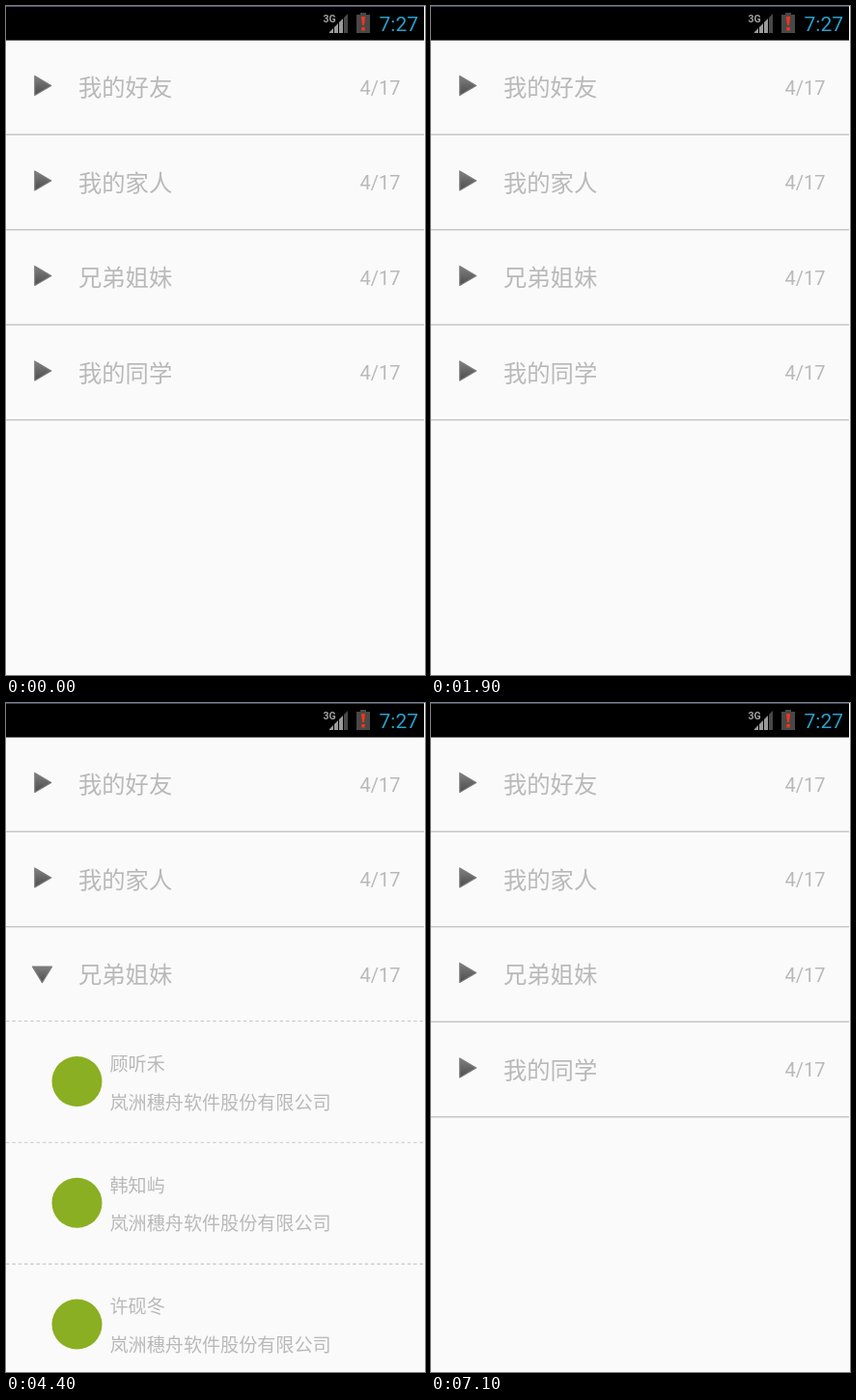
Animation of 434x693 px, one loop 8000 ms. Source, as an HTML page:

```html
<!DOCTYPE html>
<html lang="zh-CN">
<head>
<meta charset="utf-8">
<title>分组列表</title>
<style>
html, body { margin: 0; width: 100%; height: 100%; overflow: hidden; background: #fafafa; }
svg { display: block; width: 434px; height: 693px; }
text { font-family: "Noto Sans CJK SC", "Noto Sans CJK", sans-serif; fill: #b9b9b9; }
.title { font-size: 24.3px; }
.child { font-size: 19.1px; }
.count, .clock, .net { font-family: Roboto, sans-serif; }
.count { font-size: 20px; text-anchor: end; }
.pressed text { fill: #302c22; }
.clock { font-size: 21px; fill: #2a9fcb; }
.net { font-size: 10.5px; font-weight: bold; fill: #a0a0a0; }
.line { stroke: #c7c7c7; stroke-width: 1.4; }
.dash { stroke: #c9c9c9; stroke-width: 1.1; stroke-dasharray: 3.6 2.7; }
.arrow { fill: url(#steel); stroke: #7c7c7c; stroke-width: 1.2; stroke-linejoin: round; }
</style>
</head>
<body>
<svg viewBox="0 0 434 693">
  <defs>
    <linearGradient id="steel" x1="0" y1="0" x2="0" y2="1">
      <stop offset="0" stop-color="#808080"/><stop offset="1" stop-color="#4c4c4c"/>
    </linearGradient>
    <linearGradient id="edgeX">
      <stop offset="0" stop-color="#f8a305"/><stop offset=".06" stop-color="#f8a305" stop-opacity="0"/>
      <stop offset=".94" stop-color="#f8a305" stop-opacity="0"/><stop offset="1" stop-color="#f8a305"/>
    </linearGradient>
    <linearGradient id="edgeY" x1="0" y1="0" x2="0" y2="1">
      <stop offset="0" stop-color="#f8a305"/><stop offset=".25" stop-color="#f8a305" stop-opacity="0"/>
      <stop offset=".8" stop-color="#f8a305" stop-opacity="0"/><stop offset="1" stop-color="#f8a305"/>
    </linearGradient>
  </defs>
  <rect width="434" height="693" fill="#fafafa"/>
  <g id="list"></g>
  <rect width="433" height="35.6"/>
  <rect id="topEdge" width="433" height="1"/>
  <path d="M335 28v-1l4-4v5zM340 28v-6l4-4v10zM345 28v-11l4-4v15z" fill="#9b9b9b"/>
  <path d="M350 28v-16l4-4v20z" fill="#484848"/>
  <text class="net" x="328.5" y="16.5">3G</text>
  <path d="M367 7h6v2h4v19h-14V9h4z" fill="#484848"/>
  <path d="M368 11h4l-1 9h-2zM368.3 22h3.4v3.5h-3.4z" fill="#f5351b"/>
  <text class="clock" x="386.5" y="26.3">7:27</text>
</svg>
<script>
const LOOP = 8000, GROUP_H = 98.5, CHILD_H = 125.8, LIST_TOP = 35.6;
const groups = ["我的好友", "我的家人", "兄弟姐妹", "我的同学"];
const members = ["顾听禾", "韩知屿", "许砚冬"];
const company = "岚洲穗舟软件股份有限公司";

// Each step: start time, open groups, pressed group
const steps = [
  [0, []],
  [1100, [], 0], [1200, [0]], [1800, [0], 0], [1900, []],
  [2700, [], 1], [2800, [1]], [3500, [1], 1], [3600, []],
  [4400, [2]],
  [5500, [2], 1], [5600, [1, 2]], [6200, [2]],
  [7000, [2], 2], [7100, []]
];

const list = document.getElementById("list");
const topEdge = document.getElementById("topEdge");

const rule = (y, kind) => `<path class="${kind}" d="M0 ${y}H433"/>`;

function arrow(open) {
  const d = open ? "M27.5 40.5H47.5L37.5 57Z" : "M29.8 36.8L46.8 46.8L29.8 56.8Z";
  return `<path d="${d}" transform="translate(.6 1.6)" fill="#fff" opacity=".6"/>
    <path class="arrow" d="${d}"/>`;
}

function highlight() {
  return ["#fbb923", "url(#edgeX)", "url(#edgeY)"].map(fill =>
    `<rect y="-.3" width="433" height="96" fill="${fill}"/>`).join("");
}

function groupRow(title, y, open, pressed) {
  return `<g transform="translate(0 ${y})" class="${pressed ? "pressed" : ""}">
    ${pressed ? highlight() : ""}${arrow(open)}
    <text class="title" x="75" y="57.6">${title}</text>
    <text class="count" x="408.5" y="56">4/17</text>
    ${open ? rule(96.9, "dash") : rule(97.6, "line")}</g>`;
}

function childRow(name, y) {
  return `<g transform="translate(0 ${y})">
    <circle cx="73.5" cy="62.5" r="26" fill="#8aaf22"/>
    <text class="child" x="107.5" y="51.3">${name}</text>
    <text class="child" x="107.5" y="91.2">${company}</text>
    ${rule(CHILD_H, "dash")}</g>`;
}

function render([, openGroups, pressed]) {
  let y = LIST_TOP, markup = "";
  groups.forEach((title, i) => {
    const open = openGroups.includes(i);
    markup += groupRow(title, y, open, pressed === i);
    if (open) members.forEach((name, k) => {
      markup += childRow(name, y + 96.9 + k * CHILD_H);
    });
    y += GROUP_H + (open ? members.length * CHILD_H : 0);
  });
  list.innerHTML = markup;
}

let shown;
function frame() {
  const t = performance.now() % LOOP;
  const step = steps.findLast(s => s[0] <= t);
  if (step !== shown) render(shown = step);
  topEdge.setAttribute("fill", t < 900 ? "#54456b" : "#3a4560");
  requestAnimationFrame(frame);
}
frame();
</script>
</body>
</html>
```
